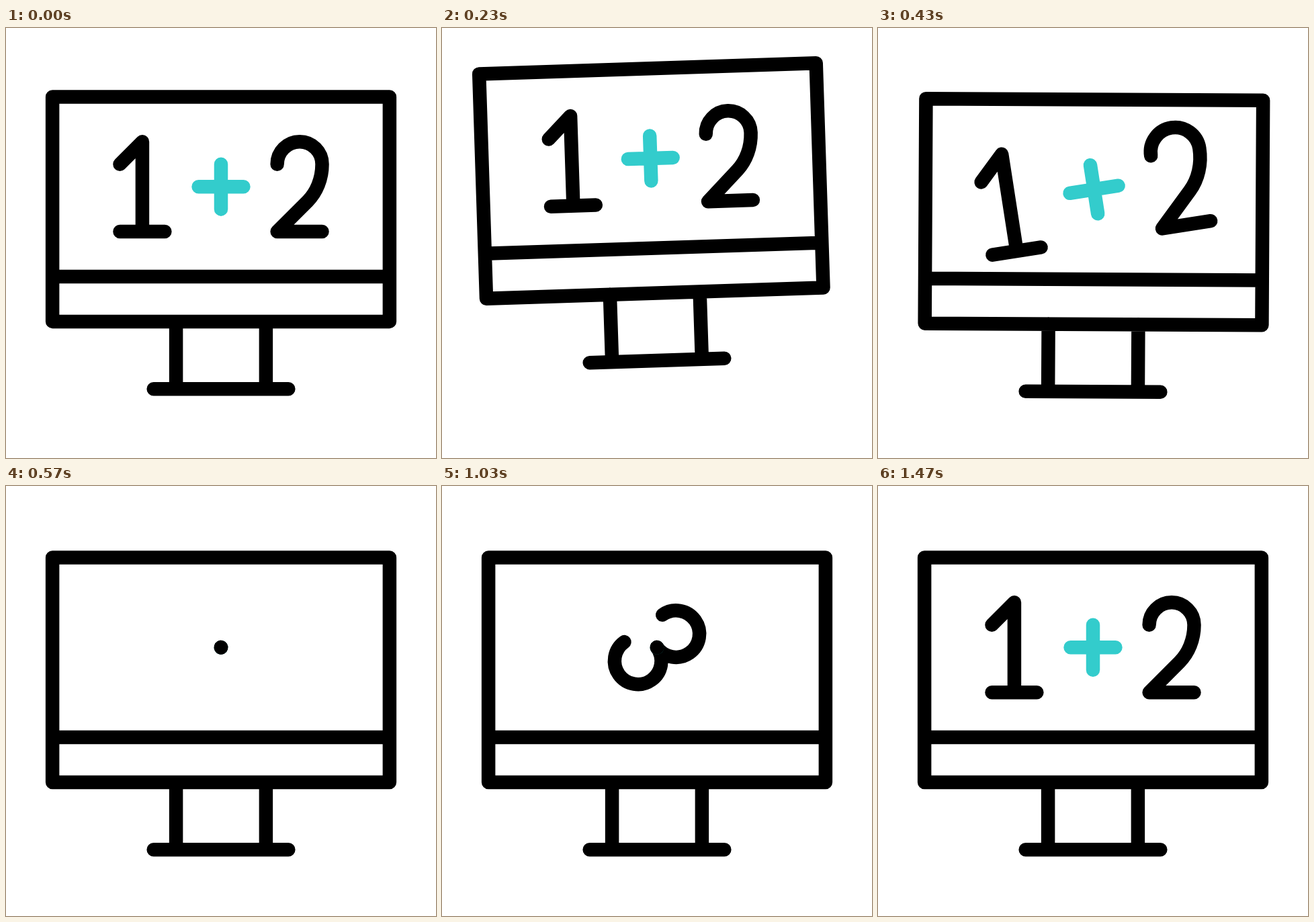
Recreate the animation shown at these times as an HTML page with a canvas. Size 640 px wide and 640 px high, loop 1.67 s.

```html
<!DOCTYPE html>
<html lang="en">
<head>
<meta charset="utf-8">
<title>Sum on a screen</title>
<style>
  html, body { margin: 0; width: 100%; height: 100%; overflow: hidden; background: #fff; }
  canvas { display: block; width: 100vw; height: 100vh; }
</style>
</head>
<body>
<canvas id="stage" width="640" height="640"></canvas>
<script>
const ctx = document.getElementById('stage').getContext('2d');
const LOOP = 1670, STEPS = 50;
const BLACK = '#000', TEAL = '#33cccc';
const UNIT = 33.45, WEIGHT = 20.5, FOOT_Y = 541.3;

// Eased progress from 0 to 1 between steps a and b
function ease(s, a, b) {
  const u = Math.min(1, Math.max(0, (s - a) / (b - a)));
  return u * u * (3 - 2 * u);
}

// All shapes are built on a grid of UNIT; the line weight stays constant
function shape(color, size, degrees, build) {
  ctx.save();
  ctx.rotate(degrees * Math.PI / 180);
  ctx.scale(UNIT * size, UNIT * size);
  ctx.beginPath();
  build();
  ctx.restore();
  ctx.strokeStyle = color;
  ctx.stroke();
}

function across(x, y, half) {
  ctx.moveTo(x - half, y);
  ctx.lineTo(x + half, y);
}

function down(x, y, half) {
  ctx.moveTo(x, y - half);
  ctx.lineTo(x, y + half);
}

function monitor() {
  ctx.rect(-7.5, -13, 15, 10);
  across(0, -5, 7.5);
  down(-2, -1.5, 1.5);
  down(2, -1.5, 1.5);
  across(0, 0, 3);
}

function plus() {
  across(0, 0, 1);
  down(0, 0, 1);
}

function one() {
  ctx.moveTo(-4.5, -1);
  ctx.lineTo(-3.5, -2);
  ctx.lineTo(-3.5, 2);
  across(-3.5, 2, 1);
}

function two() {
  ctx.moveTo(2.5, -1);
  ctx.arc(3.5, -1, 1, Math.PI, 2 * Math.PI);
  ctx.bezierCurveTo(4.5, -0.35, 4.25, 0.25, 3.85, 0.65);
  ctx.lineTo(2.5, 2);
  ctx.lineTo(4.5, 2);
}

function three() {
  ctx.moveTo(-1, -1);
  ctx.arc(0, -1, 1, -Math.PI, Math.PI / 2);
  ctx.arc(0, 1, 1, -Math.PI / 2, Math.PI);
}

function draw(s) {
  ctx.setTransform(1, 0, 0, 1, 0, 0);
  ctx.fillStyle = '#fff';
  ctx.fillRect(0, 0, 640, 640);
  ctx.lineWidth = WEIGHT;
  ctx.lineCap = ctx.lineJoin = 'round';

  // The monitor hops and rocks left, then right
  const hop = 55 * (ease(s, -1, 5) - ease(s, 5, 13));
  const left = ease(s, 0, 5) - ease(s, 5, 10);
  const right = ease(s, 5, 10) - ease(s, 10, 13.4);
  ctx.translate(320, FOOT_Y - hop);
  ctx.rotate((7.9 * right - 7.15 * left) * Math.PI / 180);
  shape(BLACK, 1, 0, monitor);
  ctx.translate(0, -9 * UNIT);

  const grow = ease(s, 23, 29) - ease(s, 29, 37.6);
  if (grow > 0) shape(BLACK, 1.205 * grow, 90 * ease(s, 23, 37), three);

  // The sum swells, spins down to a dot and later comes back
  const swell = ease(s, 7, 12.4);
  const gone = ease(s, 12.4, 17) - ease(s, 37.5, 44);
  const away = Math.max(0, gone);
  const back = ease(s, 37.5, 44);
  const size = s < 20 ? (1 + 0.145 * swell) * (1 - away) : back;
  const turn = s < 20 ? -12.5 * swell + 72.5 * away : 60 * (1 - back);
  const visible = Math.max(size, 0.002);
  shape(TEAL, visible, turn, plus);
  shape(BLACK, visible, turn, one);
  shape(BLACK, visible, turn, two);
}

// 30 steps a second, with step times rounded to 10 ms
function stepAt(t) {
  const k = Math.floor(t * 0.03 + 0.2);
  return Math.min(STEPS - 1, Math.round(k * 10 / 3) * 10 > t ? k - 1 : k);
}

const start = performance.now();
function tick() {
  draw(stepAt((performance.now() - start) % LOOP));
  requestAnimationFrame(tick);
}
tick();
</script>
</body>
</html>
```
